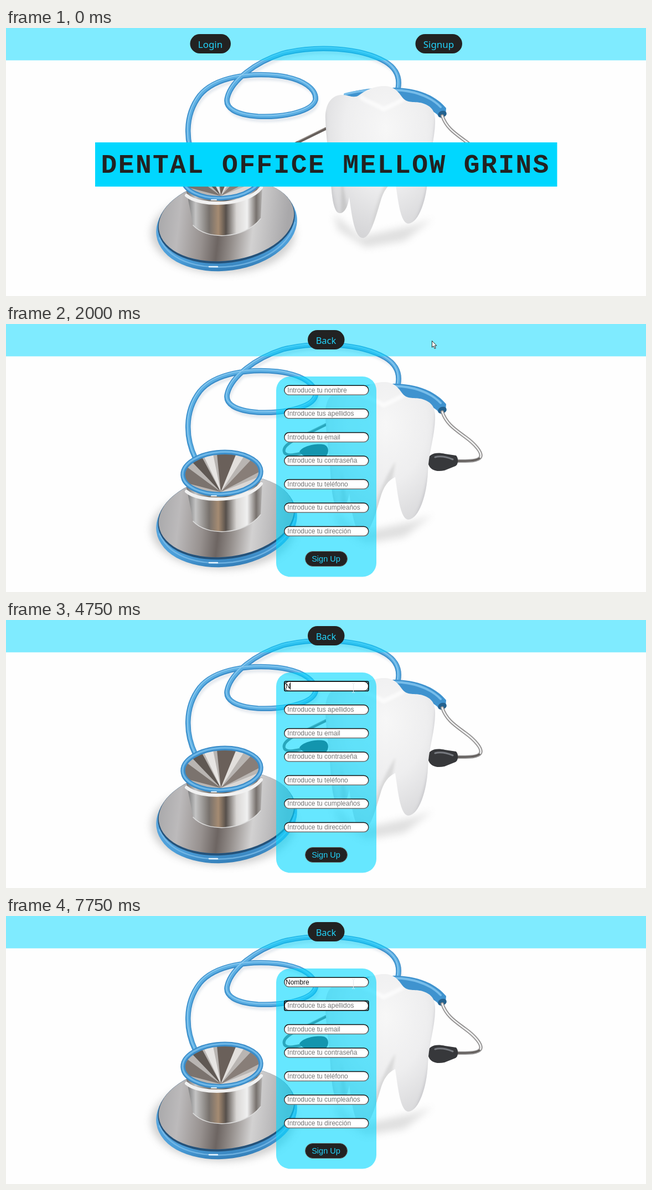
These frames come from a looping animation (1156 px wide and 485 px high, 8000 ms). An HTML page:

```html
<!DOCTYPE html>
<html lang="es">
<head>
<meta charset="utf-8">
<title>Dental clinic sign-up</title>
<style>
  html, body { margin: 0; width: 100%; height: 100%; overflow: hidden; background: #fefefe; }
  svg { display: block; width: 100%; height: 100%; }
  .nav { font: 17px "Noto Sans", "Open Sans", sans-serif; fill: #22d3fa; text-anchor: middle; }
  .title { font: bold 48px "Courier New", "Liberation Mono", monospace; letter-spacing: 2.4px; fill: #222; }
  .field { font: 12px "Liberation Sans", Arial, sans-serif; fill: #757575; white-space: pre; }
  .typed { fill: #111; }
  .send { font: 14.5px "Liberation Sans", Arial, sans-serif; fill: #22d3fa; text-anchor: middle; }
  .hint { font: 500 9.2px "Noto Sans", "Open Sans", sans-serif; fill: #151515; }
  .tube { fill: none; stroke-linecap: round; stroke-linejoin: round; }
</style>
</head>
<body>
<svg viewBox="0 0 1156 485" preserveAspectRatio="none">
  <defs>
    <filter id="soft" x="-30%" y="-30%" width="160%" height="160%"><feGaussianBlur stdDeviation="7"/></filter>
    <filter id="soft2" x="-30%" y="-30%" width="160%" height="160%"><feGaussianBlur stdDeviation="2"/></filter>
    <linearGradient id="face" x1="0" x2="1" y1=".1" y2=".25">
      <stop offset="0" stop-color="#a4a4a6"/><stop offset=".2" stop-color="#bcbabb"/>
      <stop offset=".38" stop-color="#97918f"/><stop offset=".5" stop-color="#6d6562"/>
      <stop offset=".6" stop-color="#938d8a"/><stop offset=".75" stop-color="#d2d1d1"/>
      <stop offset="1" stop-color="#a9a8aa"/>
    </linearGradient>
    <linearGradient id="column">
      <stop offset="0" stop-color="#6f6f70"/><stop offset=".12" stop-color="#c4c4c4"/>
      <stop offset=".3" stop-color="#77716c"/><stop offset=".42" stop-color="#a58b72"/>
      <stop offset=".52" stop-color="#57504b"/><stop offset=".66" stop-color="#d9d7d5"/>
      <stop offset=".8" stop-color="#f0f0f0"/><stop offset=".92" stop-color="#77716d"/>
      <stop offset="1" stop-color="#b5b3b2"/>
    </linearGradient>
    <linearGradient id="rim" x1="0" x2="0" y1="0" y2="1">
      <stop offset="0" stop-color="#68b0e4"/><stop offset=".8" stop-color="#4b9ed9"/><stop offset="1" stop-color="#347fb9"/>
    </linearGradient>
    <radialGradient id="enamel" cx=".55" cy=".28" r=".75">
      <stop offset="0" stop-color="#f7f7f7"/><stop offset=".5" stop-color="#eeeeef"/><stop offset="1" stop-color="#d4d4d6"/>
    </radialGradient>
    <linearGradient id="edge" x1="0" x2="0" y1="0" y2="1">
      <stop offset=".1" stop-color="#111"/><stop offset="1" stop-color="#707070"/>
    </linearGradient>
    <clipPath id="bowl"><ellipse cx="390" cy="270" rx="70" ry="38" transform="rotate(-3 390 270)"/></clipPath>
    <clipPath id="toothClip"><use href="#tooth"/></clipPath>
    <path id="hose" d="M342 243C325 208 321 160 350 122C378 88 440 81 490 86C540 92 561 112 559 130C553 152 500 162 455 160C415 157 394 145 400 125C408 95 450 62 500 46C560 31 640 35 685 61C705 73 712 90 708 110"/>
    <path id="tooth" d="M577 165C576 140 586 122 606 121C620 121 627 128 637 122C650 112 665 105 685 105C702 106 709 116 717 127C726 137 738 132 752 136C771 142 776 153 775 172C774 205 763 235 762 268C760 310 746 352 727 354C712 354 708 310 703 277C690 283 682 294 676 315C665 352 657 380 644 380C629 379 624 335 620 306C617 328 609 336 602 335C590 333 588 295 586 268C584 230 578 200 577 165Z"/>
  </defs>

  <!-- photo -->
  <g>
    <ellipse cx="392" cy="372" rx="130" ry="72" fill="#999" opacity=".45" filter="url(#soft)"/>
    <path d="M592 336L640 378L740 356L770 345L720 385L650 397L600 365Z" fill="#999" opacity=".3" filter="url(#soft)"/>
    <use href="#hose" class="tube" stroke="#ccd5e0" stroke-width="6" opacity=".55" filter="url(#soft2)" transform="translate(3 7)"/>

    <path class="tube" d="M578 182L527 207C508 216 499 224 503 233C507 239 520 237 532 234" stroke="#665f5b" stroke-width="5"/>
    <path class="tube" d="M575 181L527 205" stroke="#aaa39e" stroke-width="1.3"/>
    <path d="M530 231C535 222 555 216 573 218C585 220 584 237 575 241C558 246 536 242 530 231Z" fill="#303236"/>

    <use href="#hose" class="tube" stroke="#3d8fca" stroke-width="9.5"/>
    <use href="#hose" class="tube" stroke="#5cafe3" stroke-width="6" transform="translate(0 -.7)"/>
    <use href="#hose" class="tube" stroke="#8ccaf0" stroke-width="1.6" transform="translate(-1 -1.8)"/>

    <path d="M603 126C622 111 660 108 705 108C742 109 775 121 795 145L794 157L782 161C777 150 755 145 725 135L690 122Z" fill="#3f93cf"/>
    <path class="tube" d="M612 120C640 112 680 111 715 113C745 116 770 127 785 143" stroke="#77bdea" stroke-width="4"/>
    <ellipse cx="788" cy="156" rx="8" ry="6" fill="#24628f" transform="rotate(-20 788 156)"/>
    <path class="tube" d="M788 159C795 180 810 190 829 204C847 217 861 233 857 241C852 249 833 248 814 248" stroke="#8c8a8a" stroke-width="6"/>
    <path class="tube" d="M788 159C795 180 810 190 829 204C847 217 861 233 857 241" stroke="#ededed" stroke-width="2.8"/>
    <path class="tube" d="M855 243C848 248 833 248 816 248" stroke="#57524f" stroke-width="2"/>
    <path d="M762 247C763 235 776 231 793 235L813 238C818 243 817 254 812 257L792 265C774 269 762 262 762 247Z" fill="#37383b"/>
    <path class="tube" d="M775 241C786 238 797 241 807 245" stroke="#777a80" stroke-width="3"/>

    <use href="#tooth" fill="url(#enamel)"/>
    <g clip-path="url(#toothClip)" filter="url(#soft2)">
      <path d="M577 150C580 220 588 300 600 337L570 340L560 150Z" fill="#c2c2c5" opacity=".6"/>
      <path d="M776 160C769 220 765 300 737 352L775 360L790 160Z" fill="#b9b9bd" opacity=".55"/>
      <path d="M606 265C609 300 621 330 622 365L605 340Z" fill="#bbb" opacity=".6"/>
      <path d="M640 124C650 134 670 138 682 147C695 140 710 135 718 128" fill="none" stroke="#fff" stroke-width="8" opacity=".65"/>
      <path d="M703 250C690 270 672 300 660 360L690 330Z" fill="#ccc" opacity=".6"/>
    </g>

    <ellipse cx="398.500" cy="358" rx="128" ry="81" fill="url(#rim)" transform="rotate(-8 398.500 358)"/>
    <ellipse cx="398" cy="350" rx="124.500" ry="75" fill="#24527a" transform="rotate(-8 398 350)"/>
    <ellipse cx="398" cy="348" rx="123" ry="73" fill="url(#face)" transform="rotate(-8 398 348)"/>
    <path class="tube" d="M277 380C298 427 358 437 410 431C465 423 510 396 522 352" stroke="#82c1eb" stroke-width="2.500" opacity=".7"/>
    <path class="tube" d="M367 432H382" stroke="#e8f6ff" stroke-width="2.500"/>

    <path d="M326 295L338 357C362 384 430 383 460 345L463 285Z" fill="url(#column)"/>
    <path class="tube" d="M338 357C362 384 430 383 460 345" stroke="#ddd" stroke-width="1.500"/>
    <path class="tube" d="M326 303C350 324 435 323 461 289" stroke="#f1f1f1" stroke-width="6"/>
    <g clip-path="url(#bowl)">
      <rect x="315" y="225" width="150" height="90" fill="#b9b5b2"/>
      <path d="M388 304L315 250V285Z" fill="#7b736e"/>
      <path d="M388 304L325 238L348 230Z" fill="#5f5853"/>
      <path d="M388 304L352 228L372 226Z" fill="#e7e5e3"/>
      <path d="M388 304L380 225H420Z" fill="#6a605a"/>
      <path d="M388 304L420 225L434 233Z" fill="#e2dfdc"/>
      <path d="M388 304L448 240L468 262Z" fill="#887e78"/>
      <path d="M388 304L468 272V300Z" fill="#dad7d5"/>
    </g>
    <ellipse cx="390" cy="270" rx="70.500" ry="38" fill="none" stroke="#3b8dc9" stroke-width="8.500" transform="rotate(-3 390 270)"/>
    <ellipse cx="390" cy="269.500" rx="71" ry="38" fill="none" stroke="#6db7e8" stroke-width="3.500" transform="rotate(-3 390 270)"/>
    <path class="tube" d="M371 311H380" stroke="#e8f6ff" stroke-width="2"/>
  </g>

  <rect width="1156" height="58.500" fill="#00d7ff" fill-opacity=".5"/>

  <!-- home page -->
  <g data-on="0-2000">
    <rect x="332.500" y="11" width="73.500" height="35" rx="17.500" fill="#222"/>
    <text class="nav" x="369" y="35.500">Login</text>
    <rect id="signup" x="739.500" y="11" width="84.500" height="35" rx="17.500"/>
    <text class="nav" x="781.500" y="35.500">Signup</text>
    <rect x="161" y="207" width="834.500" height="80" fill="#00d7ff"/>
    <text class="title" x="171.500" y="262">DENTAL OFFICE MELLOW GRINS</text>
  </g>

  <!-- form page -->
  <g data-on="2000-8000">
    <rect x="545" y="11" width="66.500" height="35" rx="17.500" fill="#222"/>
    <text class="nav" x="578" y="35.500" style="font-size:16.500px">Back</text>
    <rect x="488" y="95" width="181" height="362.500" rx="25" fill="#00d7ff" fill-opacity=".6"/>
    <g id="rows"></g>
    <rect x="540.500" y="411.500" width="76" height="27" rx="13.500" fill="#222" stroke="#666" stroke-width="1"/>
    <text class="send" x="578" y="430">Sign Up</text>
    <text id="typed" class="field typed" x="505" y="123.500"></text>
    <rect data-on="3500-7250" x="502.800" y="111" width="152" height="17.500" rx="2.500" fill="none" stroke="#101010" stroke-width="1.700"/>
    <rect data-on="7250-8000" x="502.800" y="153.500" width="152" height="17.500" rx="2.500" fill="none" stroke="#101010" stroke-width="1.700"/>
    <rect id="caret" data-on="3500-4000,4500-7250" y="113" width="1" height="13" fill="#111"/>
    <rect data-on="7250-7750" x="505" y="155" width="1" height="13" fill="#111"/>
    <g data-on="3500-4750">
      <rect x="502" y="131" width="154" height="175" rx="3" fill="#234" opacity=".35" filter="url(#soft2)"/>
      <rect x="501.500" y="129.500" width="154.500" height="174.500" rx="2" fill="#fff"/>
      <g id="hints"></g>
    </g>
  </g>

  <!-- pointers -->
  <g id="pointer">
    <path id="arrow" d="M.5 .5V12.300L3.200 9.800L5.200 14.500L7.100 13.700L5.200 9.200H8.800Z" fill="#fff" stroke="#111" stroke-width=".9"/>
    <path id="hand" d="M4 9.500V2C4 .2 6.300 .2 6.300 2V6.500C7 5.600 8.400 5.900 8.500 7C9.300 6.300 10.500 6.700 10.600 7.700C11.500 7.200 12.600 7.700 12.600 8.900V12C12.600 13.800 11.500 14.500 11.500 16.500H5C5 14.500 1.800 12.500 .8 10.200C.1 8.700 1.800 7.800 2.900 9Z" fill="#fff" stroke="#111" stroke-width=".9"/>
    <path id="beam" d="M1 .5H2.500L3.500 1.500L4.500 .5H6M3.500 1.500V16.500M1 17.500H2.500L3.500 16.500L4.500 17.500H6" fill="none" stroke="#e4e8ea" stroke-width="1"/>
  </g>
</svg>

<script>
  const LOOP = 8000;
  const $ = id => document.getElementById(id);

  function add(parent, tag, attrs, text = "") {
    const el = document.createElementNS("http://www.w3.org/2000/svg", tag);
    for (const key in attrs) el.setAttribute(key, attrs[key]);
    el.textContent = text;
    parent.append(el);
  }

  const labels = ["nombre", "s apellidos", "email", "contraseña", "teléfono", "cumpleaños", "dirección"];
  labels.forEach((label, i) => {
    const y = 111.3 + i * 42.55;
    const prompt = label.startsWith("s ") ? " Introduce tu" + label : " Introduce tu " + label;
    add($("rows"), "rect", { x: 502.8, y, width: 152, height: 17, rx: 8.5, fill: "#fff", stroke: "url(#edge)", "stroke-width": 1.5 });
    add($("rows"), "text", { class: "field", x: 505, y: y + 12.2, "data-on": i ? "2000-8000" : "2000-4750" }, prompt);
  });
  ["Rodrigo Iván", "asdas", "aaa", "bbb", "h", "i"].forEach((hint, i) =>
    add($("hints"), "text", { class: "hint", x: 510.5, y: 151.3 + i * 27.2 }, hint));

  const timed = [...document.querySelectorAll("[data-on]")].map(el => ({
    el, spans: el.dataset.on.split(",").map(span => span.split("-").map(Number))
  }));

  // start time, x, y, shape
  const moves = [
    [0, 0, 0, ""], [500, 651, 310, "arrow"], [750, 687, 164, "arrow"], [1000, 741, 82, "arrow"],
    [1250, 762, 51, "arrow"], [1500, 770, 33, "hand"], [1750, 769, 30, "hand"], [2000, 769, 30, "arrow"],
    [2500, 726, 45, "arrow"], [2750, 647, 92, "arrow"], [3000, 630, 106, "beam"], [3250, 624, 114, "beam"]
  ];
  const keys = [4750, 5250, 5500, 6000, 6500, 6750];

  function show(el, on) { el.setAttribute("display", on ? "inline" : "none"); }

  function draw(now) {
    const t = now % LOOP;
    for (const { el, spans } of timed) show(el, spans.some(([a, b]) => t >= a && t < b));

    const [, x, y, shape] = moves.filter(move => move[0] <= t).pop();
    $("pointer").setAttribute("transform", `translate(${x} ${y})`);
    for (const id of ["arrow", "hand", "beam"]) show($(id), id === shape);
    $("signup").setAttribute("fill", t < 1500 ? "#222" : t < 1750 ? "#3a3a3a" : "#484848");

    const text = "Nombre".slice(0, keys.filter(key => key <= t).length);
    if ($("typed").textContent !== text) $("typed").textContent = text;
    $("caret").setAttribute("x", 505 + (text ? Math.floor($("typed").getComputedTextLength()) : 0));
  }

  const start = performance.now();
  function tick() {
    draw(performance.now() - start);
    requestAnimationFrame(tick);
  }
  tick();
</script>
</body>
</html>
```
